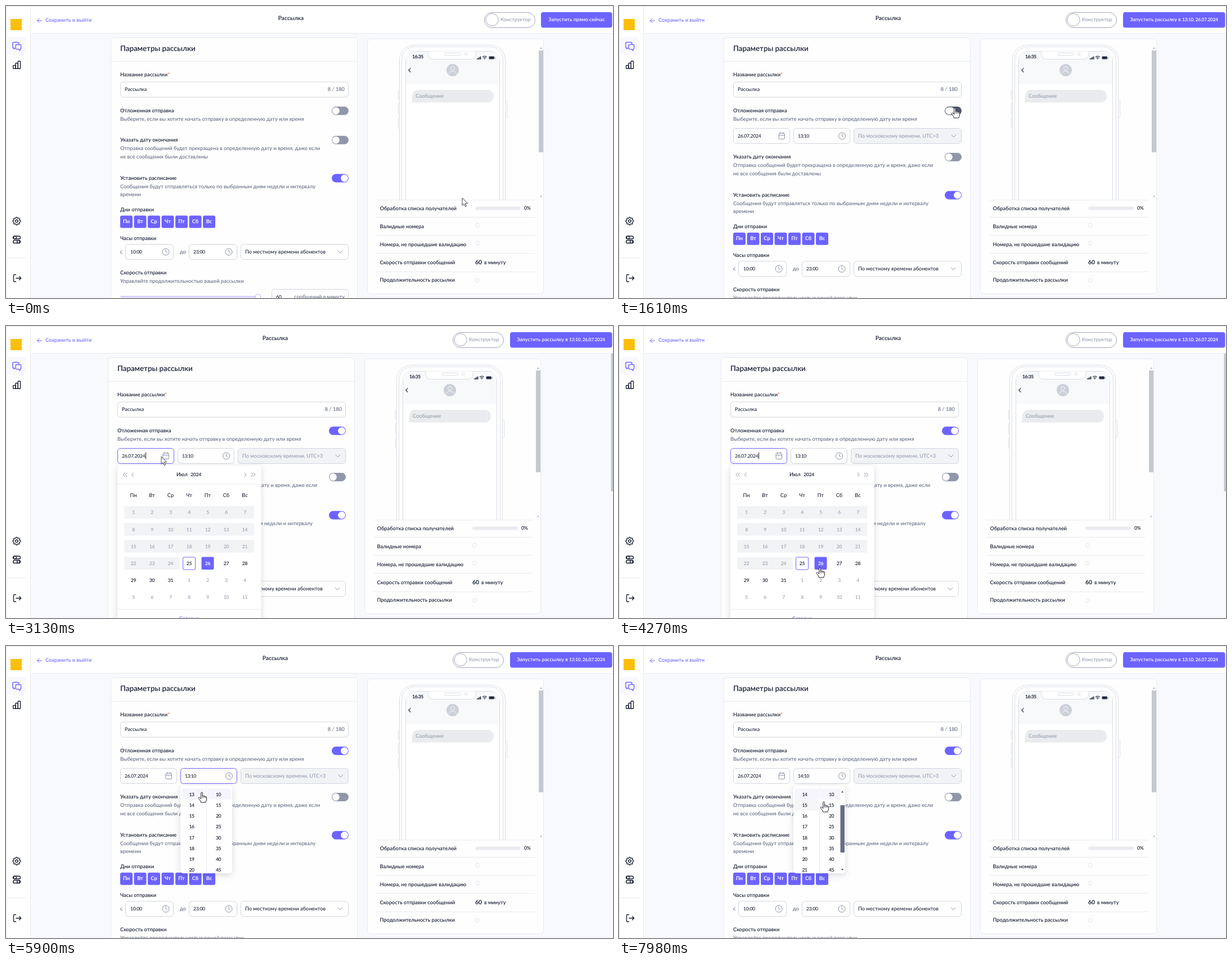
An HTML page for the animation above (8000 ms loop, 1079x519 px).

```html
<!DOCTYPE html>
<html lang="ru">
<head>
<meta charset="utf-8">
<title>Параметры рассылки</title>
<style>
html, body { margin: 0; width: 100%; height: 100%; overflow: hidden; background: #f8f9fc; }
svg { display: block; width: 1079px; height: 519px; font-family: Lato, "Open Sans", "Noto Sans", sans-serif; font-weight: 600; text-rendering: geometricPrecision; }
text { fill: #1a2135; white-space: pre; }
.title { font-size: 1.44em; }
.head { font-size: 1.12em; }
.small { font-size: .97em; }
.gray { fill: #5f6880; font-weight: 500; }
.pale { fill: #949bae; font-weight: 500; }
.violet { fill: #6c63ff; font-weight: 500; }
.white { fill: #fff; }
.bold { font-weight: 700; }
.plain { font-weight: 500; }
.mid { text-anchor: middle; }
.end { text-anchor: end; }
.num { font-size: .93em; letter-spacing: -.03em; }
.time { font-size: .93em; letter-spacing: -.055em; }
.ln { fill: none; stroke-linecap: round; stroke-linejoin: round; }
.pop { filter: drop-shadow(0 3px 6px rgba(30, 38, 66, .17)); }
.icon { stroke-width: 1.4; }
</style>
</head>
<body>
<svg id="stage" viewBox="0 0 1079 519"></svg>
<script>
const LOOP = 8000, VIOLET = '#6c63ff', INK = '#1a2135', RULE = '#e9ebf0', EDGE = '#d1d5df';
const stage = document.getElementById('stage');

// markup helpers
const text = (x, y, s, cls = '', id = '') => `<text x="${x}" y="${y}" class="${cls}" id="${id}">${s}</text>`;
const rect = (x, y, w, h, r, fill, stroke = 'none', id = '') =>
  `<rect x="${x}" y="${y}" width="${w}" height="${h}" rx="${r}" fill="${fill}" stroke="${stroke}" id="${id}"/>`;
const circle = (x, y, r, fill, stroke = 'none') => `<circle cx="${x}" cy="${y}" r="${r}" fill="${fill}" stroke="${stroke}"/>`;
const line = (d, color = INK, w = 1, id = '') => `<path class="ln" d="${d}" stroke="${color}" stroke-width="${w}" id="${id}"/>`;
const group = (id, s, extra = '') => `<g id="${id}" ${extra}>${s}</g>`;
const rule = (x1, x2, y) => line(`M${x1} ${y}H${x2}`, RULE);
const field = (x, y, w, fill = '#fff', id = '') => rect(x + .5, y + .5, w - 1, 27, 5, fill, EDGE, id);
const clock = (x, y) => circle(x, y, 6, 'none', '#8a91a6') + line(`M${x} ${y - 3.5}V${y}L${x + 2.5} ${y + 1.5}`, '#8a91a6');
const chevron = (x, y) => line(`M${x - 4} ${y - 2}l4 4 4-4`, '#8a91a6');
const toggle = (y, on, id = '') => rect(579, y - 7.5, 30, 15, 7.5, on ? VIOLET : '#9097aa', 'none', id && id + 'Bg') +
  rect(on ? 595.2 : 580, y - 6.4, 12.8, 12.8, 6.4, '#fff', 'none', id && id + 'Knob');

function sidebar() {
  const cog = [...Array(64)].map((_, i) => {
    const a = i * Math.PI / 32, r = 6.2 + .8 * Math.cos(8 * a);
    return (19 + r * Math.cos(a)).toFixed(1) + ' ' + (382.3 + r * Math.sin(a)).toFixed(1);
  }).join('L');
  const dark = line(`M${cog}z`, INK, 1.4) + circle(19, 382.3, 2.3, '#fff', INK) +
    [[12.7, 105.5], [17, 101.5], [21.3, 98]].map(([x, y]) => rect(x, y, 4.3, 111.3 - y, .8, 'none', INK)).join('') +
    [[409, 16], [416.5, 22]].map(([y, x]) => rect(12.7, y, 12.8, 5, 2.5, 'none', INK) + circle(x, y + 2.5, 2.4, '#fff', INK)).join('') +
    line('M17.5 477.5h-2.5q-1.5 0-1.5 1.5v9.5q0 1.5 1.5 1.5h2.5M18 483.7h8.5M23.7 480.7l3 3-3 3', INK, 1.4);
  return rect(0, 0, 43, 519, 0, '#fff') + line('M43.5 0V519', RULE) +
    rect(8, 23, 20, 20, 0, '#fcbf0a') +
    rect(2, 55, 33, 32, 5, '#f8f8fd') +
    line('M14 74.5h-.5q-1.5 0-1.5-1.5v-6.5q0-2 2-2h7q2 0 2 2v1', VIOLET, 1.4) +
    line('M14 74.5v2l2-1.5', VIOLET, 1.3) +
    line('M19 68.5h6q1.7 0 1.7 1.7v5q0 1.7-1.7 1.7v2.3l-3-2.3h-3q-1.7 0-1.7-1.7v-5q0-1.7 1.7-1.7z', VIOLET, 1.4) +
    group('', dark, 'class="icon"') + rule(2, 36, 447.5);
}

function header() {
  return rect(43, 0, 1036, 48, 0, '#fff') + rule(43, 1079, 48.5) +
    line('M63.5 26H55.5M59 22.5L55.5 26l3.500 3.500', VIOLET) + text(70, 28.3, 'Сохранить и выйти', 'violet') +
    group('title', text(506.5, 25.3, 'Рассылка', 'head mid')) +
    group('builder', rect(850.5, 11.5, 90, 27, 13.5, '#fff', '#a3a9ba') + circle(864, 24.5, 11, '#fff', '#a3a9ba') +
      text(879, 27.3, 'Конструктор', 'small pale')) +
    group('runNow', rect(951, 11, 126.5, 27.5, 4, VIOLET) + text(1014.5, 27, 'Запустить прямо сейчас', 'small white mid')) +
    group('runLater', rect(896, 11, 181.5, 27.5, 4, VIOLET) +
      text(986.5, 27, 'Запустить рассылку в <tspan class="num">13:10, 26.07.2024</tspan>', 'small white mid'));
}

function delayRow() {
  return field(203, 217, 101, '#fff', 'dateBox') + text(211, 234, '26.07.2024', 'num plain') +
    rect(284, 226, 10.5, 10.5, 1.5, 'none', '#8a91a6') + line('M284 229.7h10.5M286.7 224.5v2.5M291.8 224.5v2.5', '#8a91a6') +
    line('M253.5 225V236', INK, 1, 'dateCaret') +
    field(310, 217, 101, '#fff', 'timeBox') + text(318, 234, '13:10', 'time plain', 'timeText') + clock(396.5, 231) +
    line('M335.5 225V236', INK, 1, 'timeCaret') +
    field(417, 217, 192, '#f2f3f5') + text(425, 234, 'По московскому времени, UTC+3', 'pale') + chevron(595, 231);
}

function form() {
  const days = 'Пн Вт Ср Чт Пт Сб Вс'.split(' ').map((d, i) =>
    rect(203 + i * 24.5, 372.5, 22, 22, 3, VIOLET, 'none', 'day' + i) + text(214 + i * 24.5, 386.3, d, 'bold white mid')).join('');
  const lower = text(203, 241, 'Указать дату окончания') + toggle(238.3, false) +
    text(203, 256, 'Отправка сообщений будет прекращена в определенную дату и время, даже если', 'gray') +
    text(203, 271, 'не все сообщения были доставлены', 'gray') +
    text(203, 308.5, 'Установить расписание') + toggle(306, true) +
    text(203, 323.5, 'Сообщения будут отправляться только по выбранным дням недели и интервалу', 'gray') +
    text(203, 338.3, 'времени', 'gray') + text(203, 364.6, 'Дни отправки') + days +
    text(203, 415.5, 'Часы отправки') + text(203, 439.5, 'с', 'gray') + text(309, 439.5, 'до', 'gray') +
    field(212, 423, 86) + text(221, 440, '10:00', 'num plain') + clock(284, 437) +
    field(325, 423, 86) + text(333, 440, '23:00', 'num plain') + clock(396, 437) +
    field(417, 423, 192) + text(425, 440, 'По местному времени абонентов', 'plain') + chevron(594, 437) +
    text(203, 476.8, 'Скорость отправки') + text(203, 492, 'Управляйте продолжительностью вашей рассылки', 'gray') +
    rect(203, 515.3, 245, 3, 1.5, '#d3d0ff') + circle(448, 517, 4.8, '#fff', '#b9b4ff') +
    field(472, 503, 137) + text(480, 519.5, '60', 'num plain') + text(602, 519.5, 'сообщений в минуту', 'gray end');
  return rect(186.5, 56.5, 438, 490, 6, '#fefefe', RULE) + text(203, 80.3, 'Параметры рассылки', 'title') + rule(187, 624, 98.5) +
    text(203, 124.5, 'Название рассылки<tspan fill="#f0603f">*</tspan>') +
    field(203, 134.5, 406) + text(211, 151, 'Рассылка', 'small plain') + text(602, 151, '8 / 180', 'gray end') +
    text(203, 188.5, 'Отложенная отправка') +
    text(203, 203.6, 'Выберите, если вы хотите начать отправку в определенную дату или время', 'gray', 'sample') +
    toggle(186.3, false, 'delay') + group('delayRow', delayRow()) + group('lower', lower);
}

function phone() {
  const c = '#d9dce3';
  const side = [[697, 148, 18], [697, 172, 20], [697, 197, 20], [887, 167, 31]].map(([x, y, h]) => rect(x + .5, y + .5, 3, h, 1.2, '#fff', c)).join('');
  return side + rect(699.5, 69.5, 188, 340, 26, '#fff', c) + rect(703.5, 72.5, 180, 340, 23, '#fff', c) +
    rect(710.5, 80.5, 167, 340, 15, '#fff', c) +
    `<path d="M711 138V95q0-14 14-14H863q14 0 14 14V138z" fill="#f8f9fb"/>` +
    `<path d="M748 80.5q3 0 3 3v2q0 9 9 9h66q9 0 9-9v-2q0-3 3-3" fill="#fff" stroke="${c}"/>` +
    rect(779.5, 83.5, 29, 4, 2, '#fff', c) + circle(817.5, 85.5, 2.2, '#fff', c) +
    text(722, 93, '16:35', 'bold time') +
    [0, 1, 2, 3].map(i => rect(837 + i * 2, 93 - i * 1.2, 1.4, 2 + i * 1.2, .3, '#232a3d')).join('') +
    line('M847.5 90.5q3.3-2.8 6.6 0M849.2 92.5q1.6-1.3 3.2 0', '#232a3d', 1.2) + circle(850.8, 94.2, .8, '#232a3d') +
    rect(858.5, 89.5, 9.5, 5, 1.5, '#232a3d', '#8b92a4') + rect(869.2, 91, 1, 2.4, .5, '#8b92a4') +
    line('M719 110.8l-3.3 3.3 3.3 3.3', INK, 1.2) +
    circle(794, 114, 11, '#ccd1d9') + circle(794, 110.8, 3.4, 'none', '#f5f6f8') +
    line('M787.5 120.5q0-4.5 6.5-4.5t6.5 4.5', '#f5f6f8') +
    rect(722, 149, 145, 22.5, 11, '#e9ebee') + `<path d="M722 160V167q0 3-2.5 4.5H734z" fill="#e9ebee"/>` +
    text(728, 163.3, 'Сообщение', 'pale');
}

function preview() {
  const rows = ['Обработка списка получателей', 'Валидные номера', 'Номера, не прошедшие валидацию', 'Скорость отправки сообщений', 'Продолжительность рассылки'];
  return rect(642.5, 58.5, 313, 453, 6, '#fefefe', RULE) + group('', phone(), 'clip-path="url(#phoneClip)"') +
    rect(947, 79, 8, 181, 0, '#c5c8cf') + `<path d="M949 76l2-2.5 2 2.5zM949 337.5l2 2.5 2-2.5z" fill="#a9adb8"/>` +
    [345, 375.5, 407.5, 439.5, 472.5].map(y => rule(659, 940, y)).join('') +
    rows.map((s, i) => text(664.5, 362.8 + i * 31.9, s)).join('') +
    rect(834, 356.5, 81, 6, 3, '#e9ebef') + text(921, 361.8, '0%', 'num') +
    [389.7, 421.7, 487.7].map(y => circle(838, y, 3.4, '#fff', '#e1e4ea')).join('') +
    text(834, 458.5, '60', 'head bold') + text(850, 458.5, 'в минуту');
}

function calendar() {
  const col = i => 226.5 + i * 33, mid = (x, y, s, cls) => text(x, y, s, 'mid ' + cls);
  let s = rect(198, 248, 255.5, 300, 5, '#fff') +
    line('M211 261l-3 3.3 3 3.3M215 261l-3 3.3 3 3.3M226.5 261l-3 3.3 3 3.3M424 261l3 3.3-3 3.3M436 261l3 3.3-3 3.3M440 261l3 3.3-3 3.3', '#8a91a6') +
    text(303, 267, 'Июл') + text(328, 267, '2024', 'num') + rule(198, 453, 281) + rule(198, 453, 503.5);
  'Пн Вт Ср Чт Пт Сб Вс'.split(' ').forEach((d, i) => s += mid(col(i), 304, d, 'plain'));
  for (let k = 0; k < 42; k++) {
    const x = col(k % 7), y = 331 + Math.floor(k / 7) * 30.2, day = k % 31 + 1, past = k < 24;
    if (past) s += rect(x - 16.6, y - 11, 33.2, 22.5, 0, '#f2f3f5');
    if (day === 25) s += rect(x - 11, y - 10.6, 22, 22, 2, '#fff', VIOLET);
    if (day === 26) s += rect(x - 11, y - 11, 22, 22.5, 2, VIOLET);
    s += mid(x, y + 3.4, day, 'num ' + (day === 26 ? 'bold white' : past || k > 30 ? 'pale' : ''));
  }
  return s + mid(325.5, 523, 'Сегодня', 'violet');
}

function timeList() {
  const column = (x, from, step, n) => [...Array(n)].map((_, i) => text(x, 266.7 + i * 19.25, from + i * step, 'mid time')).join('');
  return rect(310, 248, 92, 156, 5, '#fff', 'none') +
    group('', rect(312, 253.5, 43, 19.5, 2, '#f6f6f8', 'none', 'hover') +
      group('hours', rect(312, 253.5, 43, 19.5, 2, '#f6f5fe', 'none', 'pick') + column(330, 13, 1, 11)) +
      rect(358, 253.5, 42, 19.5, 2, '#f6f5fe') + column(377.5, 10, 5, 8) +
      group('bar', rect(393, 253, 9, 151, 0, '#fff') + rect(393.5, 283, 7.5, 84, 0, '#666e84') +
        `<path d="M394.8 260.5l2.2-3 2.2 3zM394.8 396l2.2 3 2.2-3z" fill="#4d5468"/>`), 'clip-path="url(#listClip)"') +
    line('M356.5 248V404', RULE);
}

const cursors =
  group('arrow', '<path d="M0 0V13.5L3.2 10.6 5.4 15.7 7.5 14.8 5.3 9.9H9.6Z" fill="#fff" stroke="#2b2d35" stroke-width=".9"/>') +
  group('beam', ['#fff', '#111'].map((c, i) => line('M-3.5-6.5H-1L0-5.7 1-6.5H3.5M0-5.7V5.7M-3.5 6.5H-1L0 5.7 1 6.5H3.5', c, i ? 1.5 : 2.8)).join('')) +
  group('hand', '<path d="M-1.3 1.2C-1.3-.4 1.3-.4 1.3 1.2V6.5C1.6 5.5 3.8 5.6 3.9 7 4.4 6.2 6.2 6.4 6.4 7.7 7 7.1 8.6 7.4 8.6 8.8V12.5C8.6 15 7 15.5 7 18H-1.5C-1.7 15.5-4 13.5-5.6 10.6-6.2 9.2-4.4 8.3-3.2 9.6L-1.3 11.6Z" fill="#fff" stroke="#1c1d24"/>' +
    line('M1.3 6.5V9.5M3.9 7V9.8M6.4 7.7V10', '#1c1d24', .9));

stage.innerHTML = '<defs><clipPath id="phoneClip"><rect x="643" y="59" width="303" height="286"/></clipPath>' +
  '<clipPath id="listClip"><rect x="310" y="248" width="92" height="156" rx="5"/></clipPath></defs>' +
  rect(0, 0, 1079, 519, 0, '#f8f9fc') + group('page', form() + preview()) +
  header() + sidebar() + line('M0 .5H1079M.5 0V519', '#e4e6eb') +
  rect(1075.5, 49, 3.5, 245, 0, '#c4c7cf', 'none', 'pageBar') +
  group('calendar', calendar(), 'class="pop"') + group('times', timeList(), 'class="pop"') + group('cursor', cursors);

const $ = Object.fromEntries([...stage.querySelectorAll('[id]')].filter(e => e.id).map(e => [e.id, e]));

// one base size for all text, whichever family is present
stage.style.fontSize = '100px';
stage.style.fontSize = 32700 / $.sample.getComputedTextLength() + 'px';

const ramp = (t, a, b) => Math.min(1, Math.max(0, (t - a) / (b - a)));
const ease = p => p * p * (3 - 2 * p);
const within = (t, a, b) => t >= a && t < b;
const mix = (a, b, p) => `rgb(${a.map((v, i) => Math.round(v + (b[i] - v) * p))})`;
const show = (e, on) => e.setAttribute('display', on ? 'inline' : 'none');
const set = (e, attrs) => { for (const k in attrs) e.setAttribute(k, attrs[k]); };

const SLATE = [144, 151, 170], DARK = [78, 86, 107], BLUE = [108, 99, 255], LIGHT = [150, 144, 255], GREY = [209, 213, 223];

const trail = [
  [70, 811, 341], [720, 596, 180], [1060, 596, 180], [1070, 597, 181], [2130, 597, 181], [2480, 277, 233], [2900, 276, 232],
  [3400, 276, 232], [4200, 357, 429], [4400, 357, 429], [4680, 370, 263], [5000, 346, 232], [5640, 346, 232], [5900, 348, 260],
  [6290, 330, 320], [6620, 329, 338], [7060, 329, 338], [7430, 337, 281], [7600, 337, 281], [7980, 364, 277]];
const shapes = [[0, 'arrow'], [690, 'hand'], [2190, 'arrow'], [2440, 'beam'], [2950, 'arrow'], [4130, 'hand'],
  [4520, 'arrow'], [4960, 'beam'], [5720, 'hand']];

function pointer(t) {
  let i = 0;
  while (i < trail.length - 2 && t > trail[i + 1][0]) i++;
  const [t0, x0, y0] = trail[i], [t1, x1, y1] = trail[i + 1], p = ease(ramp(t, t0, t1));
  return [x0 + (x1 - x0) * p, y0 + (y1 - y0) * p];
}

function popup(e, p) {
  show(e, p > 0);
  set(e, { opacity: p, transform: `translate(0 ${248 * (.2 - .2 * p)}) scale(1 ${.8 + .2 * p})` });
}

function border(e, hover, focus) {
  e.setAttribute('stroke', focus ? VIOLET : mix(GREY, LIGHT, hover));
}

function render(t) {
  const [x, y] = pointer(t), delayed = t >= 1600, shifted = within(t, 2980, 4470);
  $.cursor.setAttribute('transform', `translate(${x} ${y})`);
  const shape = shapes.filter(s => s[0] <= t).pop()[1];
  for (const id of ['arrow', 'beam', 'hand']) show($[id], id === shape);

  // layout
  show($.runNow, !delayed);
  show($.runLater, delayed);
  show($.delayRow, delayed);
  $.title.setAttribute('transform', `translate(${delayed ? -28 : 0} 0)`);
  $.builder.setAttribute('transform', `translate(${delayed ? -56 : 0} 0)`);
  $.lower.setAttribute('transform', `translate(0 ${delayed ? 30.2 : 0})`);
  $.page.setAttribute('transform', `translate(${shifted ? -5 : 0} 0)`);
  show($.pageBar, shifted);

  // delayed sending switch
  const on = ease(ramp(t, 1620, 1880)), press = ramp(t, 1340, 1540) * (1 - ramp(t, 1640, 1880));
  const off = DARK.map((v, i) => SLATE[i] + (v - SLATE[i]) * ramp(t, 680, 800));
  $.delayBg.setAttribute('fill', mix(off, BLUE, on));
  set($.delayKnob, { x: 580 + 15.2 * on, width: 12.8 + 3.5 * press * (1 - on) });

  // date and time fields
  const dateFocus = within(t, 2950, 4300), timeFocus = within(t, 5230, 7570);
  border($.dateBox, t < 4300 ? ramp(t, 2420, 2550) : 0, dateFocus);
  border($.timeBox, t < 7570 ? ramp(t, 5030, 5200) : 0, timeFocus);
  const blink = from => (t - from) % 1060 < 530;
  show($.dateCaret, dateFocus && blink(2950));
  show($.timeCaret, timeFocus && blink(5230));
  $.timeText.textContent = t < 7570 ? '13:10' : '14:10';

  // popups
  popup($.calendar, ease(ramp(t, 2940, 3110)) * (1 - ease(ramp(t, 4270, 4470))));
  popup($.times, ease(ramp(t, 5480, 5650)));
  $.day6.setAttribute('fill', mix(BLUE, LIGHT, ramp(t, 4400, 4520) * (1 - ramp(t, 4650, 4850))));
  const row = Math.floor((y - 253.5) / 19.25);
  show($.hover, t > 5720 && row >= 0);
  $.hover.setAttribute('y', 253.5 + row * 19.25);
  $.hours.setAttribute('transform', `translate(0 ${-19.25 * ease(ramp(t, 7570, 7720))})`);
  $.pick.setAttribute('y', t < 7570 ? 253.5 : 272.75);
  show($.bar, t > 7500 && x > 356);
}

function tick() {
  render(performance.now() % LOOP);
  requestAnimationFrame(tick);
}
tick();
</script>
</body>
</html>
```
